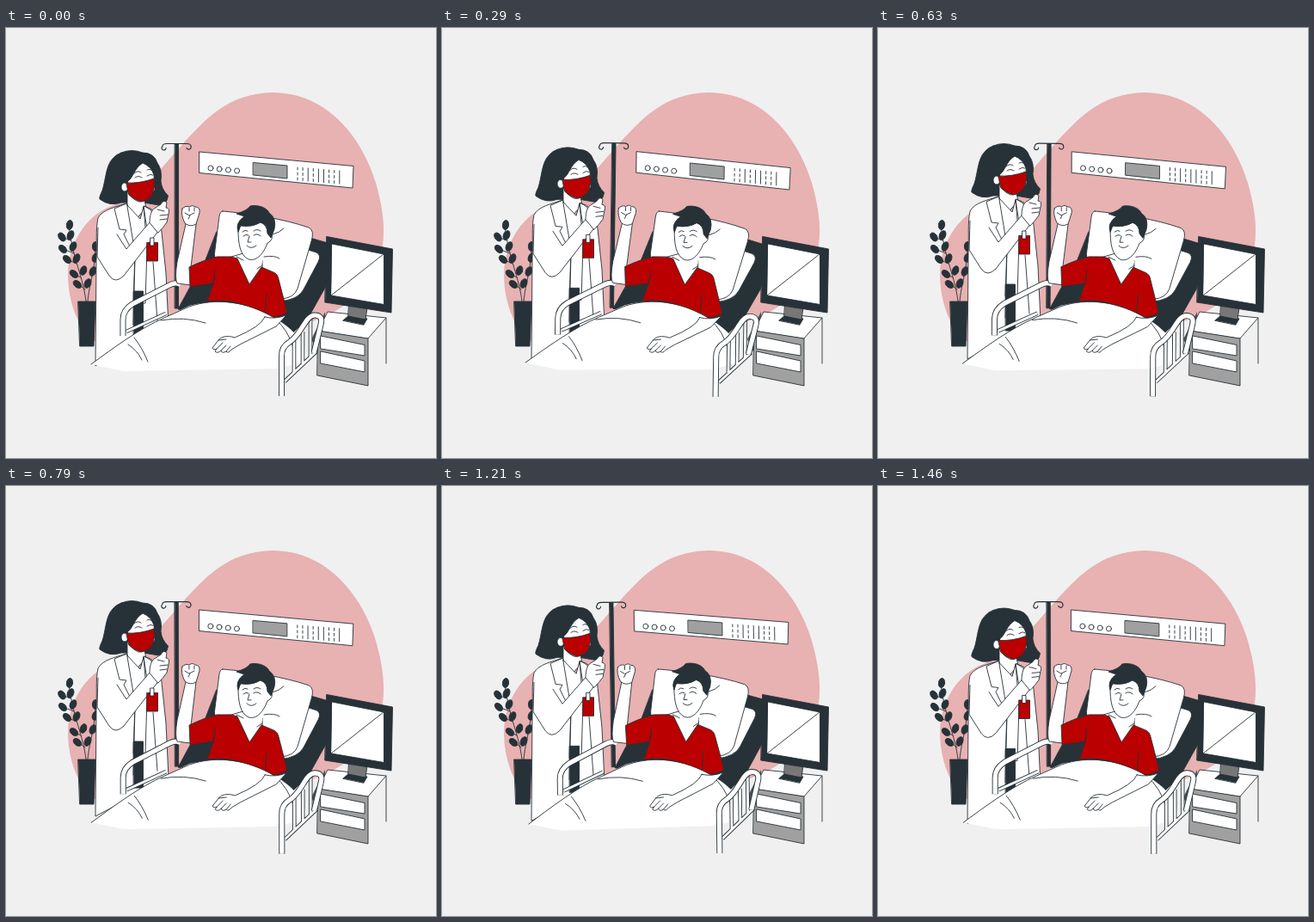
Animation of 500x500 px, one loop 1.5 s. Source, as an HTML page:

```html
<!DOCTYPE html>
<html lang="en">
<head>
<meta charset="utf-8">
<title>Hospital visit</title>
<style>
  html, body { margin: 0; height: 100%; overflow: hidden; background: #f0f0f0; }
  svg { display: block; width: 100vw; height: 100vh; fill: #fff; stroke: #263238; stroke-width: .9; stroke-linecap: round; stroke-linejoin: round; }
  .pink { fill: #e8b1b2; stroke: none; }
  .dark { fill: #263238; }
  .red { fill: #ba0000; }
  .grey { fill: #a0a0a0; }
  .line { fill: none; }
  .outer { fill: none; stroke-width: 7; stroke-linecap: butt; }
  .inner { fill: none; stroke: #fff; stroke-width: 5.2; stroke-linecap: butt; }
  .outer.thin { stroke-width: 4.6; }
  .inner.thin { stroke-width: 2.8; }
</style>
</head>
<body>
<svg viewBox="0 0 500 500">
  <defs>
    <path id="farRail" d="M136 358V339Q136 328 147 321L190 299Q198 295 203 299"/>
    <path id="farBar" d="M140 353L186 332"/>
    <path id="nearRail" d="M320.500 428V382Q320 371 330 365C344 356 348 334 359 334Q369 334 366 345L358 378"/>
    <path id="nearBars" d="M324 411L361 376M335 362V400M345 353V390M354 338V382"/>
  </defs>

  <path class="pink" d="M310 75C375 75 415 130 430 180C446 236 442 275 410 308C385 335 350 345 300 355C220 375 150 385 105 365C75 345 66 290 76 260C84 235 100 215 125 206C160 190 178 166 200 141C232 105 258 76 310 75Z"/>

  <g class="sway">
    <path d="M225 144L404 160.500L403 186L225 168.500Z"/>
    <g id="knobs"></g>
    <path class="grey" d="M287.500 156.500L327 160V175L287.500 171Z"/>
    <g id="ticks"></g>
    <path class="dark" d="M196.500 135H200.500V326H196.500Z"/>
    <path class="line" stroke-width="1.2" d="M186 139.500A2.500 2.500 0 1 1 182 137.500Q182 134.500 187 134.500H210Q215 134.500 215 137.500A2.500 2.500 0 1 1 210 139.500"/>
  </g>

  <g class="dark">
    <path class="line" d="M93 318C90 290 78 270 73 230M95 318C97 295 104 282 104 252M92 304L84 298M87 290L79 286M82 274L71 269M79 262L66 257M75 247L65 243"/>
    <g id="leaves"></g>
    <path d="M84 318H104L102 370H86Z"/>
  </g>

  <g id="doctor">
    <path class="dark" d="M134 145Q146 140 159 145Q172 145 176 157Q182 165 180 178Q181 188 188.500 195Q187 206 178 206L160 203L134 203Q121 208 109 199Q108 197 112 189C116 177 116 160 124 152Q128 147 134 145Z"/>
    <path d="M141 190V206L148 226L163 209L160 196Z"/>
    <path d="M140 204C128 208 112 211 107 221C104 235 106 250 105 270L104 393L189 348L186 285L180 228Q177 211 160 207L157 222L150 228Z"/>
    <path d="M141 206L156 222L160 208L164 255L162 320H148L150 262Z"/>
    <path class="dark" d="M148.500 306H159.500V360H148.500Z"/>
    <path class="line" d="M140 204L126 210L132 234L140 235L137 240L150 266L148 345M161 207L169 212L171 226M160 208L165 240M171 272L176 340"/>
    <path d="M107 232L106 266L120 288Q127 298 137 288L178 235L168 225L140 257L129 240"/>
    <path d="M167 226C167 218 169 211 174 209L180 205Q183 199 187 203L186 209Q191 209 189 216L187 226Q183 232 177 238Z"/>
    <path class="line" d="M176 211L184 213M179 218L188 217M179 223L187 222"/>
    <path class="red" d="M164 249.500H176.500V271H164Z"/>
    <path d="M168 244H172V253H168Z"/>
    <path d="M142 178C148 174 149 163 159 157Q169 161 172 171L173 188Q165 203 154 202Q143 197 141 188Z"/>
    <ellipse cx="138" cy="185" rx="4" ry="5"/>
    <path class="red" d="M140 180Q156 181 172 175L173 183L170 194Q166 200 157 202Q148 199 143 194Z"/>
    <path class="line" d="M149 169Q153 165 157 168M164 165Q168 163 171 167M150 174Q154 171 158 174M164 172Q168 169 171 171"/>
  </g>

  <g class="sway">
    <path class="dark" d="M245 237L357 245L381 252L371 302L352 336L330 358L200 327L213 303L231 272Z"/>
    <path d="M345 256L361 261Q367 264 363 272L346 304Q340 316 318 318Z"/>
    <path d="M252 213C285 216 323 222 352 232Q359 235 355 248L339 303Q335 314 320 315L246 270Q241 268 243 258L248 219Q249 213 252 213Z"/>
    <path class="line" d="M310 240Q318 238 323 233M300 266Q312 264 318 268"/>

    <use href="#farBar" class="outer thin"/>
    <use href="#farBar" class="inner thin"/>
    <use href="#farRail" class="outer"/>
    <use href="#farRail" class="inner"/>

    <path d="M209 228L199 272Q196 291 199 297L215 299V278L221 228Z"/>
    <path d="M205 210Q209 206 213 208Q217 205 220 208Q226 208 225 215L221 228Q214 232 208 227Q203 217 205 210Z"/>
    <path class="line" d="M208 215L213 218L219 215M213 209V213M219 209V213M214 218L212 222"/>
    <path d="M262 266L276 262L298 270V279L284 301Z"/>
    <path class="red" d="M262 266L269 268L283 298L297 278L311 284Q316 286 317 292L327 331Q315 338 301 336C280 319 255 315 233 318L241 297L214 301L213 278Q232 269 245 266Z"/>
    <path class="line" d="M243 282L241 297M303 309L301 336M235 315L243 288"/>
    <path d="M276 258L277 266L283 277L292 278L298 273V257Z" stroke="none"/>
    <path class="line" d="M268 266L276 270M298 276L292 280"/>
    <path d="M270 234C270 251 272 264 282 269C292 272 300 261 304 250Q311 247 309 239L304 228L280 222Z"/>
    <path class="dark" d="M270 237Q266 227 277 219L268 216Q281 212 284 207C295 205 304 210 306 215Q315 221 312 234L308 244L304 239Q304 229 296 226Q286 232 273 230Z"/>
    <path class="line" d="M275 237Q278 234 281 236M288 236Q292 233 296 236M276 242Q279 239 282 241M288 241Q292 238 296 242M283 242L281 249H285M280 253Q285 258 291 253"/>

    <path d="M99 391C125 372 156 349 184 337L213 323C245 314 280 318 312 337C335 350 349 367 350 386L318 396L137 399Z" stroke="none"/>
    <path class="line" d="M99 391C125 372 156 349 184 337L213 324C245 313 280 318 312 337M180 340Q207 335 232 343M149 360Q158 371 165 388M142 368Q153 375 158 386M312 337Q329 352 334 372"/>
    <path d="M301 336Q297 347 266 360C257 357 250 359 247 363L240 372Q241 375 245 373L243 376Q246 379 250 375Q251 379 256 376Q258 379 262 374L272 368L314 347L326 334Q313 339 301 336Z"/>
    <path class="line" d="M245 373L252 366M250 375L256 369M256 376L261 370M247 363L256 362"/>
  </g>

  <g>
    <path d="M355 362L371 330L373 380L362 376Z" fill="#4b5357" stroke="none"/>
    <path d="M363 352L374 330L442 337L421 361Z"/>
    <path class="line" d="M442 337V390"/>
    <path class="grey" d="M363 352L421 361V416L362 404Z"/>
    <path d="M366 358L417 368.500V381L366 373Z"/>
    <path d="M366 376L417 387V400L366 390Z"/>
    <path class="dark" d="M392 340L399 334L420 338L416 345Z"/>
    <path d="M399 321L420 325L418 339L398 335Z" fill="#777"/>
    <path class="dark" d="M373 242.500L449.500 257L448 331L371 319Z"/>
    <path d="M379 251L439.500 263V321.500L378 311Z"/>
    <path class="line" d="M378 311L439 263"/>
  </g>

  <g class="sway">
    <use href="#nearBars" class="outer thin"/>
    <use href="#nearBars" class="inner thin"/>
    <use href="#nearRail" class="outer"/>
    <use href="#nearRail" class="inner"/>
  </g>
</svg>
<script>
  const byId = id => document.getElementById(id);
  const repeat = (count, make) => Array.from({ length: count }, (_, i) => make(i)).join('');

  byId('knobs').innerHTML = repeat(4, i =>
    `<circle cx="${238 + i * 10.2}" cy="${163 + i}" r="3"/>`);

  byId('ticks').innerHTML = repeat(9, i => {
    const x = 339 + i * 6.1, y = 162 + i * .5;
    const solid = [2, 4, 5, 8].includes(i);
    return `<path d="M${x} ${y}v15" stroke-dasharray="${solid ? 'none' : '3 3'}"/>`;
  });

  const leaves = [[74, 229, 8], [65, 243, -35], [75, 241, 25], [66, 257, -45], [78, 254, 25],
    [71, 269, -45], [82, 268, 25], [79, 286, -50], [90, 282, 20], [83, 298, -50], [95, 297, 25],
    [104, 254, 0], [101, 283, 25], [104, 267, 20]];
  byId('leaves').innerHTML = leaves.map(([x, y, angle]) =>
    `<ellipse rx="3.6" ry="5.5" transform="translate(${x} ${y}) rotate(${angle})"/>`).join('');

  const PERIOD = 1500;
  const swaying = document.querySelectorAll('.sway');
  const doctor = byId('doctor');
  // Triangle wave: 0 at phase 0, 1 at one half
  const triangle = phase => 1 - Math.abs(1 - 2 * (phase % 1));

  function draw() {
    const phase = performance.now() / PERIOD % 1;
    const angle = 2 * triangle(phase + .25) - 1;
    swaying.forEach(part => part.setAttribute('transform', `rotate(${angle} 250 250)`));
    doctor.setAttribute('transform', `translate(0 ${-9.5 * triangle(phase)})`);
    requestAnimationFrame(draw);
  }
  draw();
</script>
</body>
</html>
```
